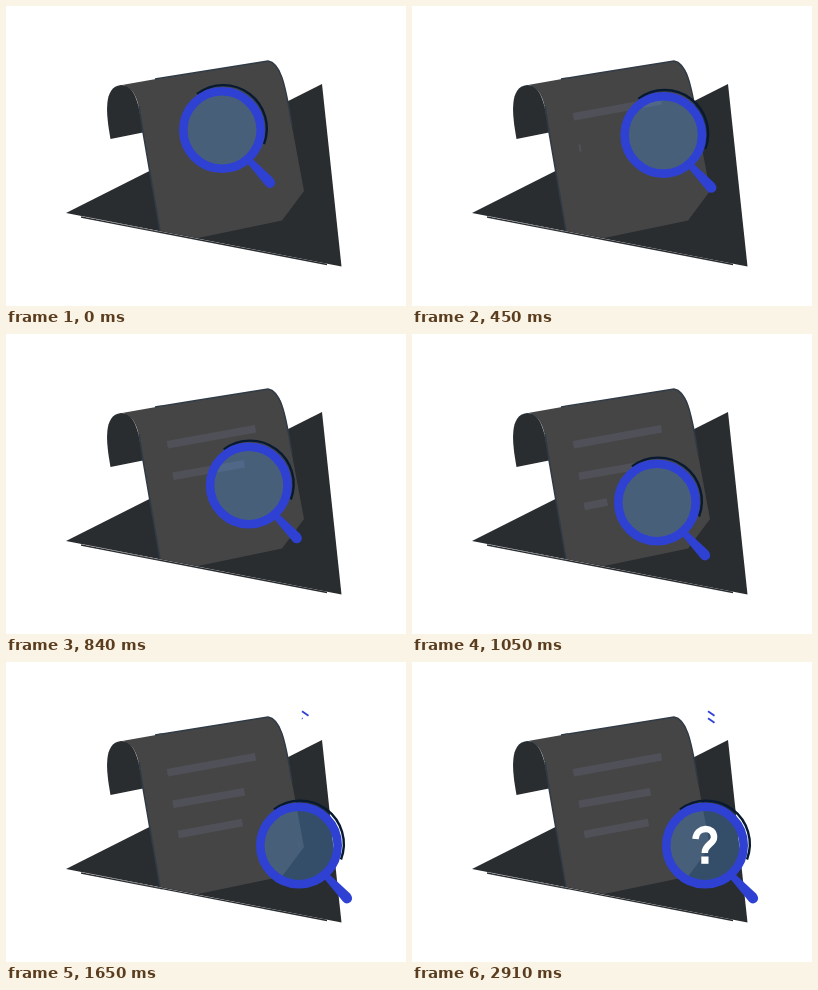
Recreate the animation shown at these times as an HTML page. Size 400 px wide and 300 px high, loop 3030 ms.

```html
<!DOCTYPE html>
<html lang="en">
<head>
<meta charset="utf-8">
<title>Document search</title>
<style>
  html, body { margin: 0; width: 100%; height: 100%; overflow: hidden; background: #fff; }
  svg { display: block; width: 100vw; height: 100vh; }
</style>
</head>
<body>
<svg viewBox="0 0 400 300" fill="none">
  <!-- backdrop -->
  <path d="M60 207 L316 78 L335.5 260.5Z" fill="#292d30"/>
  <path d="M75 211 L321 258.5" stroke="#292d30" stroke-width="1.4"/>
  <path d="M80 211.2 L152 225.2" stroke="#9a9da0" stroke-width=".6" stroke-dasharray="3 2"/>

  <!-- paper -->
  <path d="M116 79 L150 73 L262 55 C274 57 279 75 285 115 L298 185 L276 214.5 L192 232 L154 225 L136 120 C133 98 130 81 116 79Z" fill="#454546"/>
  <path d="M104.5 133 C100 108 97 81 115 79 C129 79 133 97 137 126.5Z" fill="#292d30"/>
  <path d="M133 100 L137 126 L154 225" stroke="#303b46" stroke-width="1.6"/>
  <path d="M149 73 L262 55 C274 57 279 75 286 120" stroke="#303b46" stroke-width="1.5"/>

  <g id="rows" stroke="#505058" stroke-width="7.6"></g>

  <g id="lens">
    <circle r="36" fill="rgb(80,160,255)" fill-opacity=".28"/>
    <path d="M-25 -36 A43.5 43.5 0 0 1 42 14" stroke="#081a30" stroke-width="2.4"/>
    <circle r="38.7" stroke="#2f41d3" stroke-width="8.6"/>
    <path d="M25 33 L30 28.5 L51 48 Q55 53 51.5 56.5 Q47.500 59.500 44 56Z" fill="#2f41d3"/>
  </g>

  <g id="question">
    <path d="M283.500 177 C284.500 164 302.500 164 302 175.500 C302 182 292.500 182.500 292.800 191" stroke="#fff" stroke-width="6.500"/>
    <rect x="289.300" y="194.500" width="7.200" height="7.300" fill="#fff"/>
  </g>

  <g id="ticks" stroke="#2f41d3" stroke-width="1.800"></g>
</svg>
<script>
const LOOP = 3030, STEP = 30;
const el = id => document.getElementById(id);
const clamp = v => Math.min(1, Math.max(0, v));
const progress = (t, start, end) => clamp((t - start) / (end - start));

// Each stroke: x1, y1, x2, y2, start ms, end ms
const rows = [
  [161.3, 110.8, 249.5, 94.8, 10, 262],
  [167, 142.3, 238.5, 129.8, 440, 795],
  [172.2, 172.4, 236.5, 160.4, 895, 1325]
];
const ticks = [
  [296, 49.3, 302.5, 53.8, 1500, 1620],
  [296, 56.3, 302.5, 60.8, 1640, 1760]
];

// Lens centre: time, x, y
const path = [
  [0, 216, 124], [240, 265, 117], [320, 282, 112], [540, 222, 145],
  [660, 197, 158.5], [720, 185.5, 163], [930, 280, 144], [1050, 245, 168.5],
  [1170, 209, 193], [1290, 251, 188], [1410, 293, 183.5]
];

function makeLines(parent, list) {
  return list.map(([x1, y1, x2, y2, start, end]) => {
    const line = document.createElementNS('http://www.w3.org/2000/svg', 'line');
    line.setAttribute('x1', x1);
    line.setAttribute('y1', y1);
    parent.append(line);
    return t => {
      const p = progress(t, start, end);
      line.setAttribute('x2', x1 + (x2 - x1) * p);
      line.setAttribute('y2', y1 + (y2 - y1) * p);
      line.setAttribute('visibility', p > 0 ? 'visible' : 'hidden');
    };
  });
}

const slope = (i, axis) =>
  (path[i + 1][axis] - path[i][axis]) / (path[i + 1][0] - path[i][0]);

// Tangents vanish at turning points, so the motion never overshoots
function tangent(i, axis) {
  if (i === 0) return slope(0, axis);
  if (i === path.length - 1) return 0;
  const a = slope(i - 1, axis), b = slope(i, axis);
  return a * b <= 0 ? 0 : 2 * a * b / (a + b);
}

function lensAt(t, axis) {
  const last = path.length - 1;
  if (t >= path[last][0]) return path[last][axis];
  const i = path.findIndex((p, n) => n < last && t < path[n + 1][0]);
  const d = path[i + 1][0] - path[i][0];
  const u = (t - path[i][0]) / d, v = 1 - u;
  return path[i][axis] * v * v * (1 + 2 * u) + path[i + 1][axis] * u * u * (1 + 2 * v)
    + d * u * v * (v * tangent(i, axis) - u * tangent(i + 1, axis));
}

const lines = [...makeLines(el('rows'), rows), ...makeLines(el('ticks'), ticks)];

function render(t) {
  lines.forEach(draw => draw(t));
  el('lens').setAttribute('transform', `translate(${lensAt(t, 1)} ${lensAt(t, 2)})`);
  const p = progress(t, 1640, 1880);
  const scale = 1 - (1 - p) ** 3;
  el('question').setAttribute('transform',
    `translate(293 183) scale(${scale}) translate(-293 -183)`);
  el('question').setAttribute('opacity', p);
}

const began = performance.now();
function tick() {
  const t = (performance.now() - began) % LOOP;
  render(Math.floor(t / STEP) * STEP);
  requestAnimationFrame(tick);
}
render(0);
requestAnimationFrame(tick);
</script>
</body>
</html>
```
